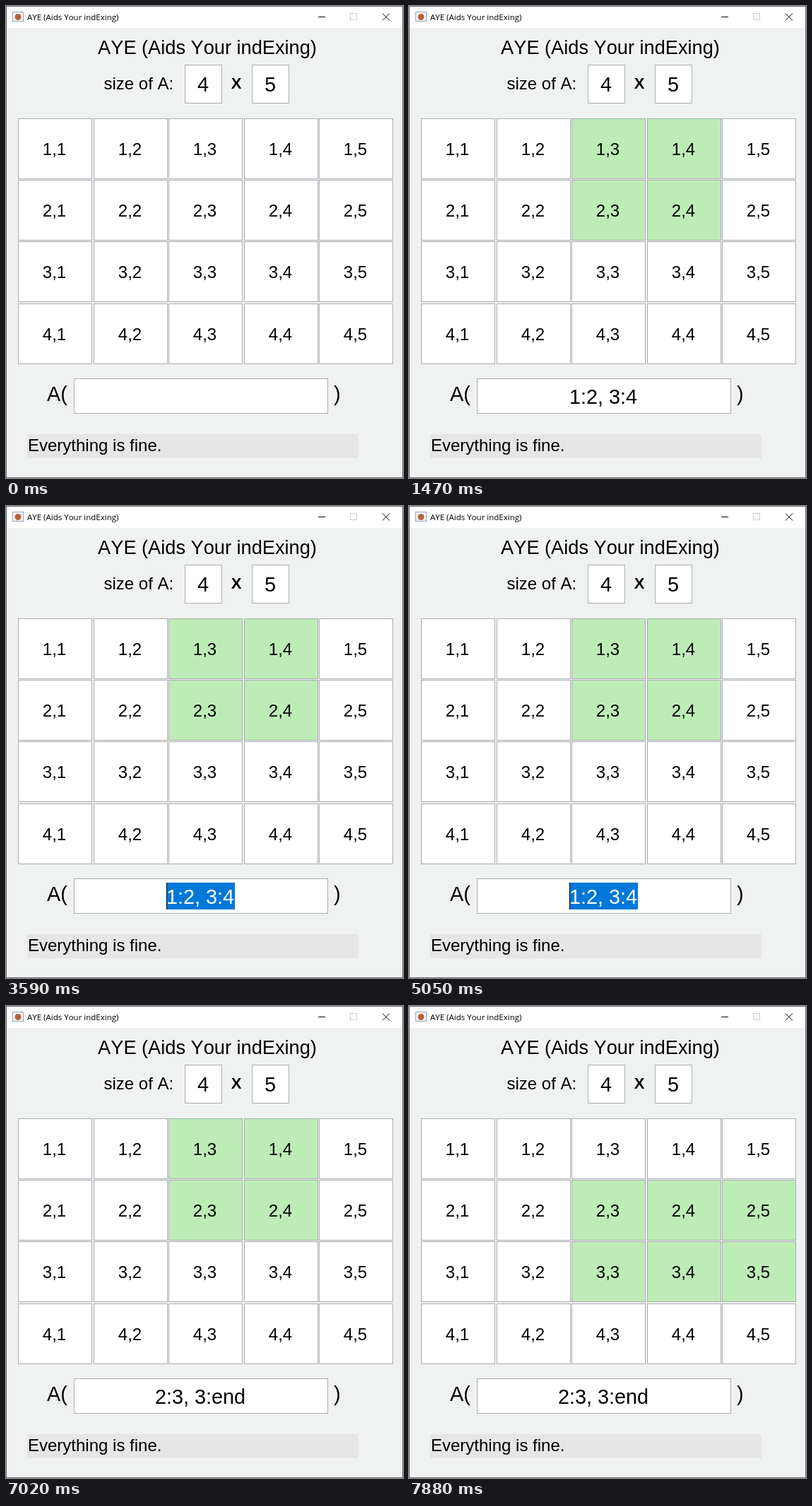
An HTML page that plays this animation: 562 by 668 pixels, repeating every 8 s.

```html
<!DOCTYPE html>
<html lang="en">
<head>
<meta charset="utf-8">
<title>AYE (Aids Your indExing)</title>
<style>
  html, body { margin: 0; width: 100%; height: 100%; overflow: hidden; }
  svg { display: block; width: 562px; height: 668px; font-family: "Liberation Sans", Arial, sans-serif; font-kerning: none; }
  text { white-space: pre; }
  .mid { text-anchor: middle; }
  .box { fill: #fff; stroke: #abadb3; }
  .picked { fill: #beecb7; }
  .big { font-size: 28.8px; }
  .medium { font-size: 24px; }
</style>
</head>
<body>
<svg id="stage" viewBox="0 0 562 668">
  <rect width="562" height="668" fill="#f0f2f1"/>
  <rect width="562" height="31" fill="#fff"/>
  <rect x=".5" y=".5" width="561" height="667" fill="none" stroke="#707070"/>

  <rect x="9.5" y="8.5" width="15" height="13" fill="#f4f7fa" stroke="#93a5b8"/>
  <circle cx="17" cy="15.5" r="4.5" fill="#b8623a"/>
  <text x="30" y="20" font-size="11.5" font-family="'Open Sans', sans-serif">AYE (Aids Your indExing)</text>
  <path d="M442 15.5h10M533 10.5l10 10m0-10l-10 10" fill="none" stroke="#000"/>
  <rect x="487.5" y="10.5" width="9" height="9" fill="none" stroke="#ccc"/>

  <text class="mid" x="285" y="68" font-size="27.2">AYE (Aids Your indExing)</text>
  <text class="medium" x="138.5" y="118">size of A:</text>
  <text class="mid" x="326" y="117" font-size="22" font-weight="bold">X</text>
  <rect class="box" x="253.5" y="83.5" width="52" height="54"/>
  <rect class="box" x="348.5" y="83.5" width="52" height="54"/>
  <text class="big mid" x="279" y="121">4</text>
  <text class="big mid" x="374" y="121">5</text>

  <g id="grid"></g>

  <text class="big" x="58" y="559">A(</text>
  <text class="big" x="464" y="559">)</text>
  <rect class="box" x="96.5" y="527.5" width="359" height="49"/>
  <rect id="selection" x="227" y="533" width="97" height="38" fill="#0078d7"/>
  <text id="entry" class="big mid" x="275" y="563"></text>
  <rect id="caret" y="533" width="1" height="38"/>

  <rect x="30" y="606" width="469" height="34" fill="#e6e6e6"/>
  <text class="medium" x="31" y="630">Everything is fine.</text>
</svg>
<script>
const LOOP = 8000, CENTER = 275;
const $ = id => document.getElementById(id);
const entry = $('entry'), caret = $('caret'), selection = $('selection');

function add(parent, tag, attributes, content = '') {
  const node = document.createElementNS('http://www.w3.org/2000/svg', tag);
  for (const name in attributes) node.setAttribute(name, attributes[name]);
  node.textContent = content;
  return parent.appendChild(node);
}

const cells = [];
[159, 246, 333, 421].forEach((y, r) => [17, 124, 230, 337, 443].forEach((x, c) => {
  const rect = add($('grid'), 'rect', { class: 'box', x: x + .5, y: y + .5, width: 104, height: 85 });
  add($('grid'), 'text', { class: 'medium mid', x: x + 51.5, y: y + 52 }, `${r + 1},${c + 1}`);
  cells.push({ row: r + 1, col: c + 1, rect });
}));

// Each state carries over whatever the next one does not change.
const states = [{ time: 0, text: '', caret: false, selected: false, picked: null }];
const last = () => states[states.length - 1];
const at = (time, change) => states.push({ ...last(), ...change, time });
const type = (chars, time, step) => [...chars].forEach((char, i) =>
  at(time + i * step, { text: last().text + char, caret: true }));
const blink = (time, count, step = 213) => {
  for (let i = 0; i < count; i++) at(time + i * step, { caret: !last().caret });
};

type('1:2, 3', 150, 128);
blink(1020, 1);
type(':4', 1090, 70);
blink(1390, 1);
at(1470, { picked: [1, 2, 3, 4] });   // first row, last row, first column, last column
blink(1560, 5);
blink(2640, 5, 210);
at(3590, { selected: true, caret: true });
blink(3800, 5, 215);
blink(4900, 2);
at(5190, { text: '', selected: false });
type('2:3, ', 5190, 107.5);
blink(5830, 1);
blink(6070, 2);
type('3:end', 6380, 106);
blink(7020, 1);
at(7090, { picked: [2, 3, 3, 5] });
blink(7240, 4);

// Digits and the letters e, n, d are twice as wide as the punctuation.
const textWidth = text => [...text].reduce((sum, char) => sum + (/\w/.test(char) ? 16 : 8), 0);

function show({ text, caret: caretOn, selected, picked }) {
  const half = textWidth(text) / 2;
  entry.textContent = text;
  entry.setAttribute('fill', selected ? '#fff' : '#000');
  selection.setAttribute('visibility', selected ? 'visible' : 'hidden');
  caret.setAttribute('visibility', caretOn ? 'visible' : 'hidden');
  caret.setAttribute('x', CENTER + (selected ? -half : half));
  for (const { row, col, rect } of cells) {
    const on = picked && row >= picked[0] && row <= picked[1] && col >= picked[2] && col <= picked[3];
    rect.classList.toggle('picked', !!on);
  }
}

const start = performance.now();
let shown;
function frame() {
  const time = (performance.now() - start) % LOOP;
  const state = states.filter(s => s.time <= time).pop();
  if (state !== shown) show(shown = state);
  requestAnimationFrame(frame);
}
frame();
</script>
</body>
</html>
```
